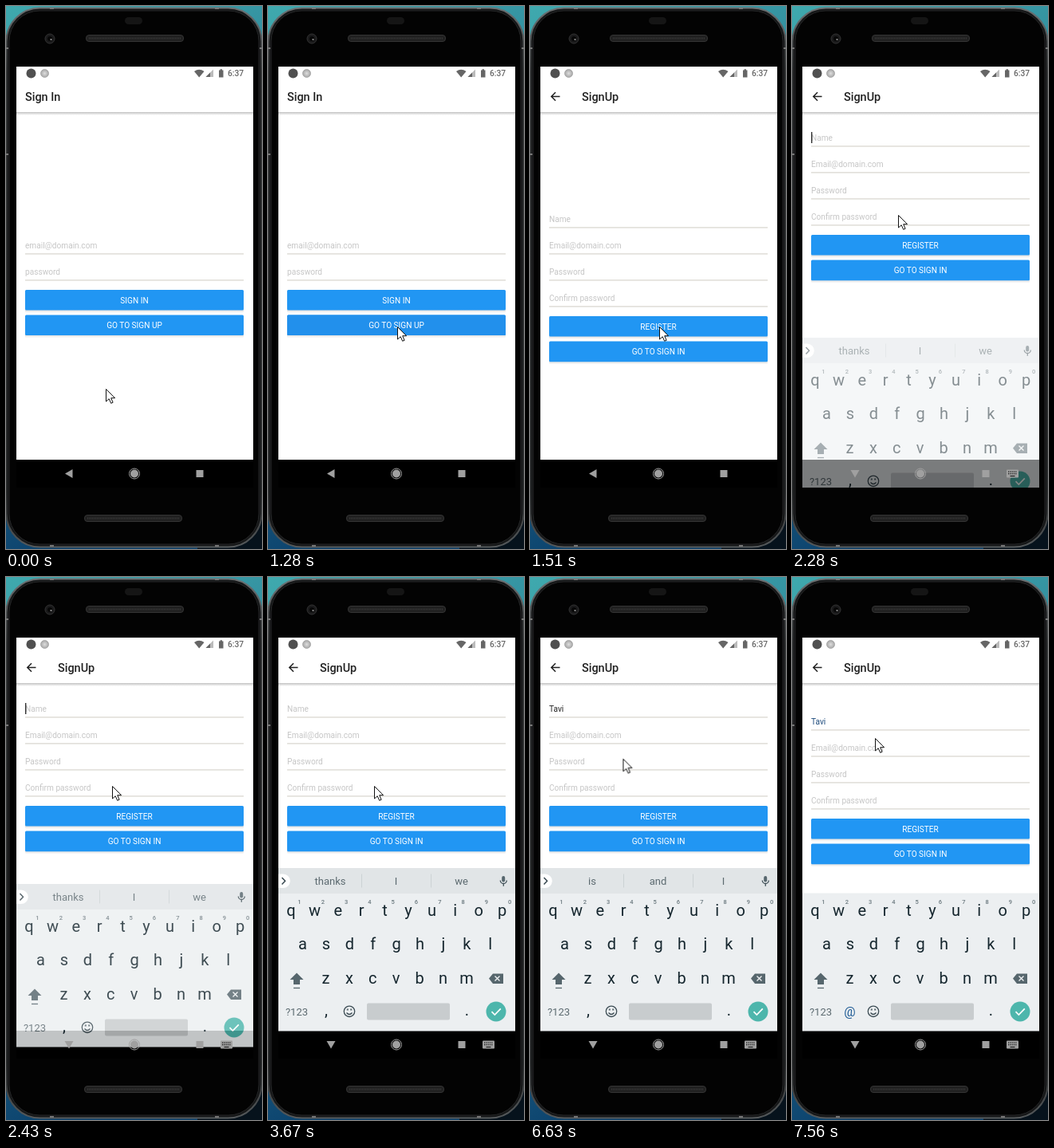
These frames come from a looping animation (321x681 px, 8 s). An HTML page:

```html
<!DOCTYPE html>
<html lang="en">
<head>
<meta charset="utf-8">
<title>Sign up flow</title>
<style>
html, body { margin: 0; width: 100%; height: 100%; overflow: hidden; background: #000; }
svg { display: block; width: 321px; height: 681px; font-family: Roboto, sans-serif; }
.title { font-size: 14.45px; font-weight: 500; fill: #212121; }
.hint { font-size: 10.15px; fill: #c6c6c6; }
.label { font-size: 10.1px; fill: #fff; text-anchor: middle; }
.key { font-size: 20px; fill: #15262e; text-anchor: middle; }
.digit { font-size: 7.5px; font-weight: 500; fill: #6a787e; text-anchor: middle; }
.word { font-size: 13px; fill: #5c6a70; text-anchor: middle; }
.icon { fill: #56666d; }
.line { fill: none; stroke: #3c4c54; stroke-width: 1.3; }

/* One 8 s loop: 1% = 80 ms */
.anim { animation: 8s step-end infinite; }
.off { opacity: 0; }

#cursor { animation-name: pointer; }
@keyframes pointer {
  0% { transform: translate(125px, 480px); }
  4.5% { transform: translate(125px, 480px); animation-timing-function: steps(10, jump-both); }
  14.125% { transform: translate(162px, 402px); }
  19.875% { transform: translate(162px, 402px); animation-timing-function: steps(4, jump-both); }
  23.75% { transform: translate(133px, 262px); }
  80% { transform: translate(133px, 262px); animation-timing-function: steps(6, jump-both); }
  85.75%, to { transform: translate(104px, 202px); }
}

#press { animation-name: press; }
@keyframes press { 15.125% { opacity: 1; } 18%, to { opacity: 0; } }

#signup { animation-name: open; }
@keyframes open {
  0% { opacity: 0; transform: translateY(15px); }
  17% { opacity: .35; transform: translateY(15px); }
  17.9% { opacity: .85; transform: translateY(3px); }
  18.85%, to { opacity: 1; transform: none; }
}

#form { animation-name: lift; }
@keyframes lift {
  0% { transform: none; }
  28.45% { transform: translateY(-102px); }
  88.75%, to { transform: translateY(-86px); }
}

#keyboard { animation-name: rise; }
@keyframes rise {
  0% { opacity: 0; transform: translateY(80px); }
  27.575% { opacity: .15; transform: translateY(80px); }
  28.45% { opacity: .52; transform: translateY(51px); }
  29.5% { opacity: .82; transform: translateY(20px); }
  30.45% { opacity: .96; transform: translateY(5px); }
  31.375%, to { opacity: 1; transform: none; }
}
#back { animation-name: leave; }
#dismiss { animation-name: enter; }
@keyframes leave { 28.45%, to { opacity: 0; } }
@keyframes enter { 28.45%, to { opacity: 1; } }

#nameCaret { animation-name: nameCaret; }
@keyframes nameCaret {
  0% { opacity: 0; transform: none; }
  26.625% { opacity: 1; }
  33.25% { opacity: 0; }
  39% { opacity: 1; }
  45.875% { opacity: 0; }
  50.875% { opacity: 1; transform: translateX(6px); }
  53.875% { transform: translateX(11px); }
  55.75% { transform: translateX(16px); }
  56.7% { transform: translateX(18.6px); }
  60.75% { opacity: 1; transform: translateX(21px); }
  67.375% { opacity: 0; }
  73.125% { opacity: 1; }
  80% { opacity: 0; }
  85.75% { opacity: 1; }
  87.875%, to { opacity: 0; transform: translateX(21px); }
}
#mailCaret { animation-name: mailCaret; }
@keyframes mailCaret { 87.875% { opacity: 1; } 94.5%, to { opacity: 0; } }

#composing { animation-name: composing; }
@keyframes composing {
  0% { width: 0; }
  50.875% { width: 6px; }
  53.875% { width: 11px; }
  55.75% { width: 16px; }
  56.7% { width: 18.6px; }
  60.75%, to { width: 0; }
}
#nameHint { animation-name: nameHint; }
@keyframes nameHint { 50.875%, to { opacity: 0; } }
#typed { fill: #222; font-size: 10.15px; animation-name: blur; }
@keyframes blur { 87.875%, to { fill: #1c4a7c; } }
#typed tspan { fill-opacity: 0; }
#c1 { animation-name: c1; }
#c2 { animation-name: c2; }
#c3 { animation-name: c3; }
#c4 { animation-name: c4; }
@keyframes c1 { 50.875%, to { fill-opacity: 1; } }
@keyframes c2 { 53.875%, to { fill-opacity: 1; } }
@keyframes c3 { 55.75%, to { fill-opacity: 1; } }
@keyframes c4 { 56.7%, to { fill-opacity: 1; } }

#strip, #comma { animation-name: dropStrip; }
#at { animation-name: showAt; }
@keyframes dropStrip { 87.875%, to { opacity: 0; } }
@keyframes showAt { 87.875%, to { opacity: 1; } }
#w0 { animation-name: w0; }
#w1 { animation-name: w1; }
#w2 { animation-name: w2; }
#w3 { animation-name: w3; }
#w4 { animation-name: w4; }
@keyframes w0 { 0% { opacity: 1; } 51.75%, to { opacity: 0; } }
@keyframes w1 { 51.75% { opacity: 1; } 53.875%, to { opacity: 0; } }
@keyframes w2 { 53.875% { opacity: 1; } 57.625%, to { opacity: 0; } }
@keyframes w3 { 57.625% { opacity: 1; } 60.75%, to { opacity: 0; } }
@keyframes w4 { 60.75%, to { opacity: 1; } }
</style>
</head>
<body>
<svg viewBox="0 0 321 681">
  <defs>
    <linearGradient id="desk" x2=".25" y2="1">
      <stop stop-color="#3fa9ae"/><stop offset=".5" stop-color="#2b7f96"/><stop offset="1" stop-color="#0b406c"/>
    </linearGradient>
    <linearGradient id="rim" x2="0" y2="1">
      <stop stop-color="#6b7072"/><stop offset=".12" stop-color="#3a3c3d"/>
      <stop offset=".9" stop-color="#2c2e2f"/><stop offset="1" stop-color="#55595b"/>
    </linearGradient>
    <linearGradient id="shade" x2="0" y2="1">
      <stop stop-color="#000" stop-opacity=".24"/><stop offset="1" stop-color="#000" stop-opacity="0"/>
    </linearGradient>
    <radialGradient id="ball"><stop stop-color="#ddd"/><stop offset="1" stop-color="#a8a8a8"/></radialGradient>
    <clipPath id="screen"><rect x="13" y="76" width="297" height="493"/></clipPath>
    <clipPath id="panel"><rect x="13" y="76" width="297" height="528"/></clipPath>
  </defs>

  <!-- Phone body -->
  <rect width="321" height="681" fill="url(#desk)"/>
  <path d="M240 640H321V681H240Z" fill="#06121c"/>
  <rect x=".5" y="2.5" width="320" height="676" rx="42" fill="#161718" stroke="url(#rim)" stroke-width="2"/>
  <rect x="4" y="6" width="313" height="669" rx="38" fill="#030303" stroke="#242526"/>
  <path d="M0 53h3M318 53h3M0 186h3M55 3h5M262 3h5M55 677h5M262 677h5" stroke="#777" stroke-width="2"/>
  <rect x="149" y="14" width="22" height="9" rx="4.5" fill="#151515"/>
  <circle cx="55" cy="41" r="6" fill="#1a1a1b" stroke="#333"/>
  <circle cx="55" cy="41" r="3" fill="#070707"/>
  <circle cx="56.5" cy="42" r="1.1" fill="#999"/>
  <g fill="#202020" stroke="#343434">
    <rect x="100.5" y="36.5" width="122" height="8" rx="3.5"/>
    <rect x="98.5" y="638.5" width="122" height="8" rx="3.5"/>
  </g>
  <path d="M104 40.5h115M102 642.5h115" stroke="#393939" stroke-width="2" stroke-dasharray="1 1"/>
  <rect x="13" y="569" width="297" height="35"/>

  <!-- App -->
  <g clip-path="url(#screen)">
    <rect x="13" y="76" width="297" height="493" fill="#fff"/>
    <g id="signin">
      <rect x="13" y="133" width="297" height="4" fill="url(#shade)"/>
      <text class="title" x="24" y="119">Sign In</text>
    </g>
    <g id="signup" class="anim">
      <rect x="13" y="92" width="297" height="480" fill="#fff"/>
      <rect x="13" y="133" width="297" height="4" fill="url(#shade)"/>
      <path d="M37.5 113.5H27M32 108.3L26.8 113.5L32 118.7" fill="none" stroke="#222" stroke-width="1.5"/>
      <text class="title" x="65" y="119">SignUp</text>
      <g id="form" class="anim"></g>
    </g>
    <g fill="#666">
      <circle cx="31.5" cy="84.5" r="6" fill="#505050"/>
      <circle cx="48.5" cy="84.5" r="5" fill="url(#ball)" stroke="#999" stroke-width=".7"/>
      <path d="M236 82Q242 77.500 248.500 82L242.200 89.500Z"/>
      <path d="M260 79.500V89H250.500Z" fill="#bbb"/>
      <path d="M256 83.500V89H250.500Z"/>
      <path d="M267 80.500h1.500v-1.200h2.500v1.200h1.500v9h-5.500z"/>
      <text x="298" y="88.300" text-anchor="end" font-size="10.200" font-weight="500">6:37</text>
    </g>
  </g>

  <!-- Keyboard -->
  <g clip-path="url(#panel)">
    <g id="keyboard" class="anim">
      <rect x="13" y="396.500" width="297" height="173" fill="#eceff1"/>
      <g id="strip" class="anim">
        <rect x="13" y="365" width="297" height="32" fill="#e1e5e7"/>
        <path d="M117.500 372.500v17M204.500 372.500v17" stroke="#ccd2d4"/>
        <path d="M13 372.500H19A8.500 8.500 0 0 1 19 390H13Z" fill="#fff"/>
        <path d="M17.500 377L21.500 381.200L17.500 385.400" fill="none" stroke="#37474f" stroke-width="1.500"/>
        <rect x="293.200" y="375" width="4" height="7.500" rx="2" class="icon"/>
        <path class="line" d="M291.300 380.500a4 4 0 0 0 8 0M295.300 384.500v3.200"/>
      </g>
      <g id="keys"></g>
      <path class="icon" d="M36 496.500L44.500 505H40V511H32V505H27.500Z"/>
      <path d="M32 515.500h8" stroke="#56666d" stroke-width="1.300"/>
      <path class="icon" d="M277 503.500L282 497.500H295V510H282Z"/>
      <path d="M284.500 500.500l6 6m0-6l-6 6" stroke="#eceff1" stroke-width="1.400"/>
      <text class="word" x="36" y="549.500">?123</text>
      <text id="comma" class="key anim" x="73" y="550">,</text>
      <text id="at" class="key anim off" x="72.500" y="550.500" style="font-size:16px;fill:#1d5a94">@</text>
      <circle class="line" cx="102" cy="544.800" r="6.700"/>
      <path class="line" d="M98.500 546.500q3.500 4 7 0"/>
      <path class="icon" d="M98.800 541.500h2v2h-2zM103.200 541.500h2v2h-2z"/>
      <rect x="124" y="534.500" width="104" height="21" rx="2" fill="#c8ccce"/>
      <text class="key" x="249.500" y="550">.</text>
      <circle cx="286" cy="545" r="12.500" fill="#4db6ac"/>
      <path d="M280.500 545.200L284.300 549L291.800 541.300" fill="none" stroke="#fff" stroke-width="1.700"/>
    </g>
  </g>

  <!-- Navigation -->
  <g fill="#a0a0a0">
    <path id="back" class="anim" d="M74 586.500L83.500 581V592Z"/>
    <circle cx="161" cy="586.500" r="5"/>
    <circle cx="161" cy="586.500" r="6.500" fill="none" stroke="#a0a0a0"/>
    <rect x="238.500" y="582" width="9" height="9"/>
    <g id="dismiss" class="anim off">
      <path d="M73.500 582H84.500L79 591.500Z"/>
      <rect x="269" y="581.500" width="15" height="10" rx="1"/>
      <path d="M271 584.200h11M271 586.700h11" stroke="#111" stroke-width="1.200" stroke-dasharray="1.200 1.100"/>
      <path d="M273.500 589.500h6" stroke="#111"/>
    </g>
  </g>

  <path id="cursor" class="anim" d="M.5.5V16L4.200 12.700L6.700 18.300L9.100 17.200L6.700 11.700H11.600Z" fill="#fff" stroke="#111"/>
</svg>

<script>
const find = id => document.getElementById(id);
const add = (id, markup) => find(id).insertAdjacentHTML("beforeend", markup);

const text = (cls, x, y, value, extra = "") =>
  `<text class="${cls}" x="${x}" y="${y}" ${extra}>${value}</text>`;

const field = (y, hint, extra) =>
  text("hint", 24, y, hint, extra) +
  `<rect x="24" y="${y + 6.3}" width="274" height="1.2" fill="#d8d5cd"/>`;

const button = (y, label, overlay = "") =>
  `<rect x="24" y="${y + 22}" width="274" height="7" rx="2" fill="url(#shade)"/>
   <rect x="24" y="${y}" width="274" height="25.6" rx="1.5" fill="#2196f3"/>${overlay}` +
  text("label", 161, y + 16.6, label);

const caret = (id, y) =>
  `<rect id="${id}" class="anim off" x="24" y="${y}" width="1.4" height="14" fill="#333"/>`;

add("signin",
  field(304, "email@domain.com") + field(337, "password") +
  button(356, "SIGN IN") +
  button(387.4, "GO TO SIGN UP",
    `<rect id="press" class="anim off" x="24" y="387.4" width="274" height="25.6" rx="1.5" fill="#2290ec"/>`));

const letters = [..."Tavi"].map((c, i) => `<tspan id="c${i + 1}" class="anim">${c}</tspan>`).join("");
find("nameHint");
add("form",
  field(271, `<tspan>Name</tspan>`, `id="nameHint" style="animation:8s step-end infinite nameHint"`) +
  field(304, "Email@domain.com") + field(337, "Password") + field(370, "Confirm password") +
  button(389, "REGISTER") + button(420.6, "GO TO SIGN IN") +
  `<text id="typed" class="anim" x="24" y="271">${letters}</text>
   <rect id="composing" class="anim" x="24" y="272.5" width="0" height=".8" fill="#222"/>` +
  caret("nameCaret", 260) + caret("mailCaret", 293));

const suggestions = ["thanks I we", "The T To", "Take Ta Tax", "Tax Tavi Taxi", "is and I"];
suggestions.forEach((set, i) => {
  const words = set.split(" ").map((w, k) => text("word", [78, 160.5, 242.5][k], 385.7, w)).join("");
  add("strip", `<g id="w${i}" class="anim off">${words}</g>`);
});

const rows = [["qwertyuiop", 29, 424.5], ["asdfghjkl", 43.5, 467], ["zxcvbnm", 72.5, 509.5]];
for (const [chars, left, y] of rows)
  [...chars].forEach((c, i) => add("keys", text("key", left + 29.4 * i, y, c)));
[..."1234567890"].forEach((c, i) => add("keys", text("digit", 39.5 + 29.3 * i, 409.8, c)));
</script>
</body>
</html>
```
